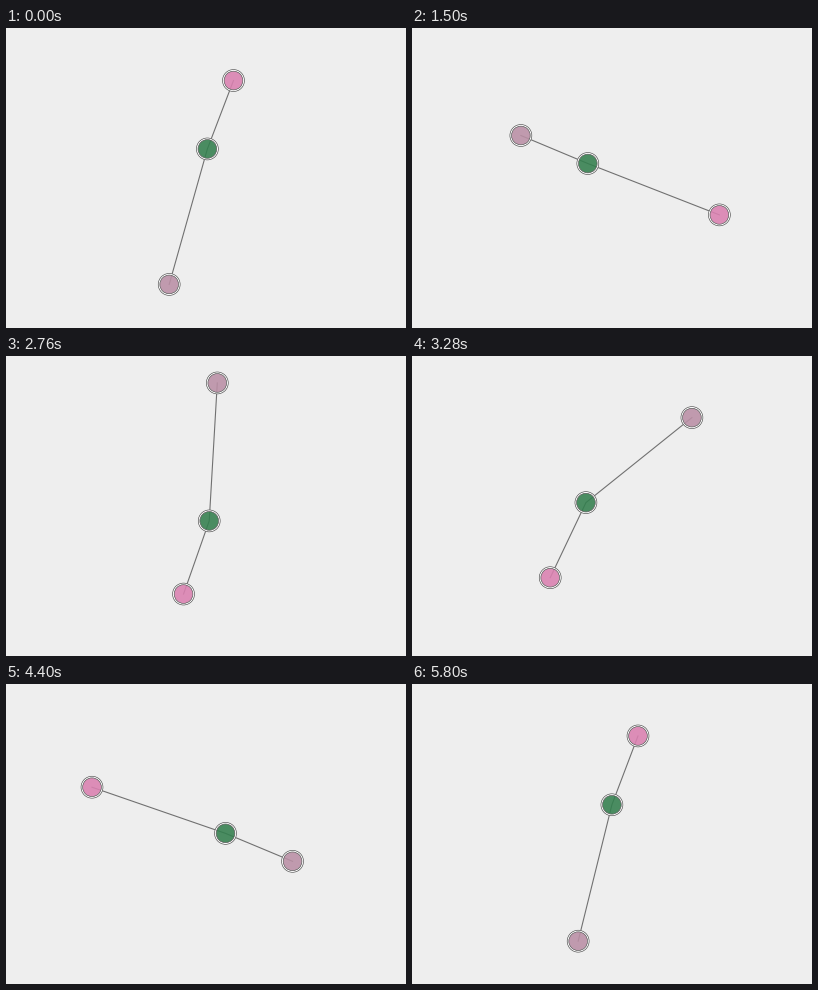
A matplotlib script for the animation above (5820 ms loop, 400 px wide and 300 px high).

```python
import numpy as np
import matplotlib.pyplot as plt
from matplotlib.animation import FuncAnimation
from matplotlib.patches import Circle

W, H, DPI = 400, 300, 100
FRAMES, STEP = 291, 20
PERIOD = 5.85                      # seconds per turn of the outer pair
CENTER = np.array([197.35, 143.3])  # fixed centre of mass
PX = 72 / DPI                      # one pixel in points


def polar(r, deg):
    a = np.radians(deg)
    return r * np.array([np.cos(a), np.sin(a)])


def wave(t, peak):
    return np.cos(4 * np.pi * (t - peak) / PERIOD)


def bodies(i):
    # the loop is cut a little short, so it hops right after its first picture
    t = i * STEP / 1000 + (0.03 if i else 0)
    turn = 360 * t / PERIOD
    arm = polar(106.9, -72.4 + turn + 0.4 * wave(t, 0.85))
    inner = polar(22.9 + 1.2 * wave(t, 0.8),
                  -81.1 + 3 * turn + 2 * wave(t, 0.4))
    return [CENTER + arm - inner / 2, CENTER + inner, CENTER - arm - inner / 2]


def ring(r, color, width, z):
    return Circle((0, 0), r, fc="none", ec=color, lw=width * PX, zorder=z)


class Node:
    def __init__(self, ax, color):
        self.parts = [
            Circle((0, 0), 9.5, fc=color, ec="none", alpha=0.88, zorder=2),
            ring(10.15, "white", 1.9, 3),
            ring(9.35, "#404040", 0.6, 4),
            ring(10.95, "#404040", 0.6, 4),
        ]
        for part in self.parts:
            ax.add_patch(part)

    def move(self, pos):
        for part in self.parts:
            part.center = tuple(pos)


fig = plt.figure(figsize=(W / DPI, H / DPI), dpi=DPI, facecolor="#eeeeee")
ax = fig.add_axes([0, 0, 1, 1])
ax.set_xlim(0, W)
ax.set_ylim(H, 0)
ax.axis("off")

link, = ax.plot([], [], color="#707070", lw=1.1 * PX, zorder=1)
nodes = [Node(ax, c) for c in ("#da80b0", "#337f4e", "#ba8fa5")]


def draw(i):
    points = bodies(i)
    link.set_data(*zip(*points))
    for node, pos in zip(nodes, points):
        node.move(pos)
    return [link] + [p for n in nodes for p in n.parts]


anim = FuncAnimation(fig, draw, frames=FRAMES, interval=STEP,
                     repeat=True, repeat_delay=0, blit=False)
plt.show()
```
